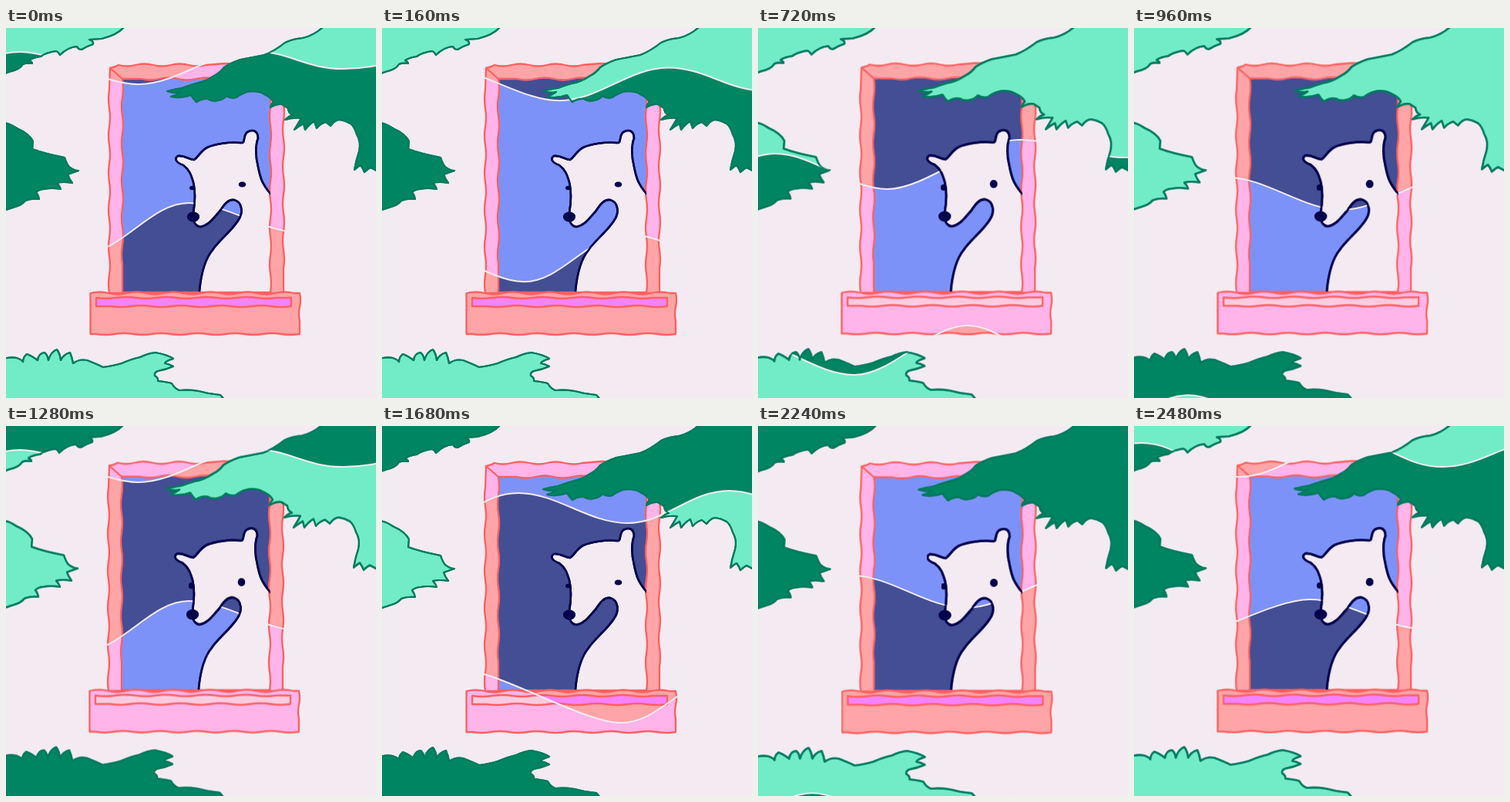
An HTML page without scripts for the animation above (2560 ms loop, 480 by 480 pixels).

```html
<!DOCTYPE html>
<html lang="en">
<head>
<meta charset="utf-8">
<title>Bear at the window</title>
<style>
  html, body { margin: 0; width: 100%; height: 100%; overflow: hidden; background: #f3ebf1; }
  svg { display: block; width: 100vw; height: 100vh; }
  path, rect { stroke-linejoin: round; stroke-linecap: round; }

  .tree { fill: var(--tree); stroke: #007a60; stroke-width: 2.2; }
  .sky { fill: var(--sky); }
  .frame { fill: var(--frame); stroke: #ff6060; stroke-width: 2.3; fill-rule: evenodd; }
  .strip { fill: var(--strip); }
  .fur { fill: var(--fur, #f3ebf1); stroke: #03034c; stroke-width: 2.6; }
  .face { fill: #03034c; }
  .wave { fill: none; stroke: #f3ebf1; stroke-width: 2; }

  /* Colours swap whenever a new wave enters at the top. */
  .flip, .flop { animation: flip 2.56s -.24s step-end infinite; }
  .flop { animation-delay: -1.52s; }
  @keyframes flip {
    0%, to { --tree: #72ecc6; --sky: #434e94; --frame: #ffa4a7; --strip: #f583ff; }
    50% { --tree: #008562; --sky: #7c92f8; --frame: #ffb4ea; --strip: #ffcbe1; }
  }

  /* Crests and troughs drift right while the wave sinks. */
  .upper { animation: upper 1.28s -.24s infinite; }
  .lower { animation: lower 1.28s -.24s infinite; }
  @keyframes upper {
    0% { animation-timing-function: steps(2); d: path("M-560 20S-470 60-420 60S-330 10-280 10S-190 45-140 45S-70 3-20 3S80 46 130 46S216 8 266 8S310 42 360 42S450-5 500-5V999H-700Z"); }
    12.5% { animation-timing-function: steps(1); d: path("M-500 30S-420 70-370 70S-300 25-250 25S-170 60-120 60S-40 22 10 22S87 66 137 66S230 20 280 20S350 53 400 53S480 20 530 20V999H-700Z"); }
    18.75% { animation-timing-function: steps(5); d: path("M-470 35S-400 80-350 80S-280 30-230 30S-155 70-105 70S-32 31 18 31S122 73 172 73S268 30 318 30S387 53 437 53S520 35 570 35V999H-700Z"); }
    50% { animation-timing-function: steps(4); d: path("M-360 90S-280 140-230 140S-150 90-100 90S10 126 60 126S127 87 177 87S268 126 318 126S400 84 450 84S540 125 590 125S680 90 730 90V999H-700Z"); }
    75% { animation-timing-function: steps(4); d: path("M-250 160S-170 220-120 220S-28 163 22 163S118 209 168 209S288 145 338 145S428 168 478 168S570 140 620 140S710 180 760 180S850 150 900 150V999H-700Z"); }
    to { d: path("M-120 215S-33 265 17 265S104 204 154 204S253 245 303 245S409 202 459 202S550 230 600 230S690 200 740 200S830 240 880 240S970 200 1020 200V999H-700Z"); }
  }
  @keyframes lower {
    0% { animation-timing-function: steps(2); d: path("M-530 320S-440 260-390 260S-305 310-255 310S-170 215-120 215S-33 265 17 265S104 204 154 204S253 245 303 245S409 202 459 202S550 230 600 230V999H-700Z"); }
    12.5% { animation-timing-function: steps(1); d: path("M-470 340S-380 270-330 270S-245 330-195 330S-105 225-55 225S-8 280 42 280S178 225 228 225S325 263 375 263S470 220 520 220S610 250 660 250V999H-700Z"); }
    18.75% { animation-timing-function: steps(5); d: path("M-450 345S-360 280-310 280S-225 335-175 335S-90 235-40 235S50 292 100 292S187 227 237 227S335 266 385 266S490 225 540 225S640 255 690 255V999H-700Z"); }
    50% { animation-timing-function: steps(4); d: path("M-310 410S-220 330-170 330S-80 395-30 395S50 316 100 316S260 385 310 385S390 328 440 328S550 380 600 380S700 330 750 330S850 370 900 370V999H-700Z"); }
    75% { animation-timing-function: steps(4); d: path("M-160 465S-70 405-20 405S75 450 125 450S222 386 272 386S365 450 415 450S510 390 560 390S650 450 700 450S800 400 850 400S950 440 1000 440V999H-700Z"); }
    to { d: path("M-40 580S50 500 100 500S195 560 245 560S340 500 390 500S490 560 540 560S630 500 680 500S770 560 820 560S920 500 970 500S1070 560 1120 560V999H-700Z"); }
  }

  /* Hand-drawn line boil: four drawings, each held for two steps. */
  .boil { animation: nudge .64s step-end infinite; }
  @keyframes nudge {
    0%, to { transform: none; }
    25% { transform: translate(-.5px, .5px); }
    50% { transform: translate(-.8px, -.6px); }
    75% { transform: translate(-1px, -.4px); }
  }
  .eye { transform-box: fill-box; transform-origin: center; animation: blink .64s step-end infinite; }
  @keyframes blink {
    0%, to { transform: scaleY(.65); }
    25% { transform: none; }
  }
</style>
</head>
<body>
<svg viewBox="0 0 480 480">
  <defs>
    <clipPath id="belowUpper"><path class="upper"/></clipPath>
    <clipPath id="belowLower"><path class="lower"/></clipPath>

    <g id="bear" class="boil">
      <path class="fur" d="M350 223L343 215C333 203 330 196 327 180C323 165 324 150 327 143C327 133 320 131 313 135C307 140 311 150 305 149C290 147 270 151 261 155C252 160 250 167 244 171C236 170 232 165 223 166C217 170 222 175 230 178C238 184 240 190 243 200C246 212 245 228 243 240C242 250 245 257 252 258C264 256 270 245 277 238C283 229 288 222 296 223C307 226 308 240 301 250C292 264 275 277 268 288C257 301 253 320 251 341V350H350Z"/>
      <ellipse class="face" cx="243" cy="245" rx="8" ry="6.5"/>
      <ellipse class="face eye" cx="241.500" cy="207.500" rx="3.500" ry="3.800"/>
      <ellipse class="face eye" cx="306.500" cy="203" rx="4.700" ry="4.900"/>
    </g>

    <g id="window" class="boil">
      <path class="frame" d="M135 52Q141 51 146 48q11 3 22 0t23 0 23 0 23 0 23 0L283 46 360 48q2 12 0 24t0 24 0 24 0 24 0 24 0 24 0 24 0 24 0 24 0 24 0 24V344H134q-2-12 0-24t0-24 0-24 0-24 0-24 0-24 0-24 0-24 0-24 0-24 0-24ZM151 66q2 12 0 24t0 24 0 24 0 24 0 24 0 24 0 24 0 24 0 24 0 24V343H343q2-12 0-24t0-24 0-24 0-24 0-24 0-24 0-24 0-24 0-24 0-24V66q-12 3-24 0t-24 0-24 0-24 0-24 0-24 0-24 0Z"/>
      <path class="frame" d="M135 52L151 66"/>
      <path class="frame" d="M109.500 344q12-3 24 0t24 0 24 0 24 0 24 0 24 0 24 0 24 0 24 0 24 0 24 0H381q2 9 0 18t0 18V397q-12 2-24 0t-24 0-24 0-24 0-24 0-24 0-24 0-24 0-24 0-24 0-24 0H109.500Z"/>
      <path class="frame strip" d="M117 350q13 2 26 0t26 0 26 0 26 0 26 0 26 0 26 0 26 0 26 0H370V361q-13 2-26 0t-26 0-26 0-26 0-26 0-26 0-26 0-26 0-26 0H117Z"/>
    </g>

    <g id="trees" class="boil">
      <path class="tree" d="M-9-9H160L152 0Q144 9 124 14L108 15Q114 17 113 21Q104 24 98 28Q94 28 92 24Q80 25 70 35Q67 30 64 30Q52 32 45 37Q36 38 30 42Q34 44 34 46Q26 45 22 47Q18 54 4 57L-9 62Z"/>
      <path class="tree" d="M420-9L410 0Q398 10 385 13Q372 14 362 19Q348 30 335 35Q320 38 304 41Q292 45 283 51Q278 58 270 62Q258 70 246 72Q236 75 228 78Q220 79 209 82Q220 85 226 83Q221 87 214 89Q226 92 240 87Q243 92 247 96Q254 91 262 92Q268 96 275 94Q282 93 286 88Q292 92 299 90Q308 83 318 82Q330 82 335 86Q344 90 347 96Q343 100 343 103Q351 98 358 99L366 104Q366 110 372 113Q367 114 362 119Q372 116 383 117Q379 124 374 132Q380 127 386 124L388 132Q394 124 400 121L403 130Q408 124 415 122L421 127Q427 119 433 119Q440 120 447 124Q452 128 455 138Q461 148 458 160Q454 172 452 184Q456 180 460 178Q463 182 465 187Q469 183 473 181L490 190V-9Z"/>
      <path class="tree" d="M-9 121Q6 124 14 130Q30 137 35 147L34 157Q50 163 76 168Q79 177 82 180Q88 185 94 185L80 190Q82 196 86 201Q74 199 66 201Q70 205 71 209Q58 207 50 209Q44 209 39 213Q42 217 43 222Q33 221 25 224Q21 229 15 231L-9 239Z"/>
      <path class="tree" d="M-9 431Q4 426 14 428Q20 430 22 433Q22 427 27 423Q33 425 41 431Q42 422 50 421Q54 424 55 431Q58 420 66 417Q70 422 71 431Q75 423 83 421Q86 428 87 435Q95 429 105 431Q118 436 126 440Q140 438 150 435Q164 429 174 427Q184 422 194 421Q210 424 217 429Q207 432 206 435Q212 436 217 439Q208 443 197 445Q192 447 193 451Q198 454 197 458Q208 459 215 461Q219 468 225 470Q238 469 250 471Q264 475 278 476L290 490H-9Z"/>
    </g>

    <g id="scene">
      <rect width="480" height="480" fill="#f3ebf1"/>
      <rect class="sky" x="150" y="65" width="194" height="279"/>
      <use href="#bear"/>
      <use href="#window"/>
      <use href="#trees"/>
    </g>
  </defs>

  <g class="flip"><use href="#scene"/></g>
  <g class="flop" clip-path="url(#belowUpper)"><use href="#scene"/></g>
  <g class="flip" clip-path="url(#belowLower)"><use href="#scene"/></g>
  <path class="wave upper"/>
  <path class="wave lower"/>

  <!-- Ink redrawn over the wave lines -->
  <g style="--tree: none; --fur: none">
    <svg width="343" height="342" style="width: 343px; height: 342px"><use href="#bear"/></svg>
    <use href="#trees"/>
  </g>
</svg>
</body>
</html>
```
